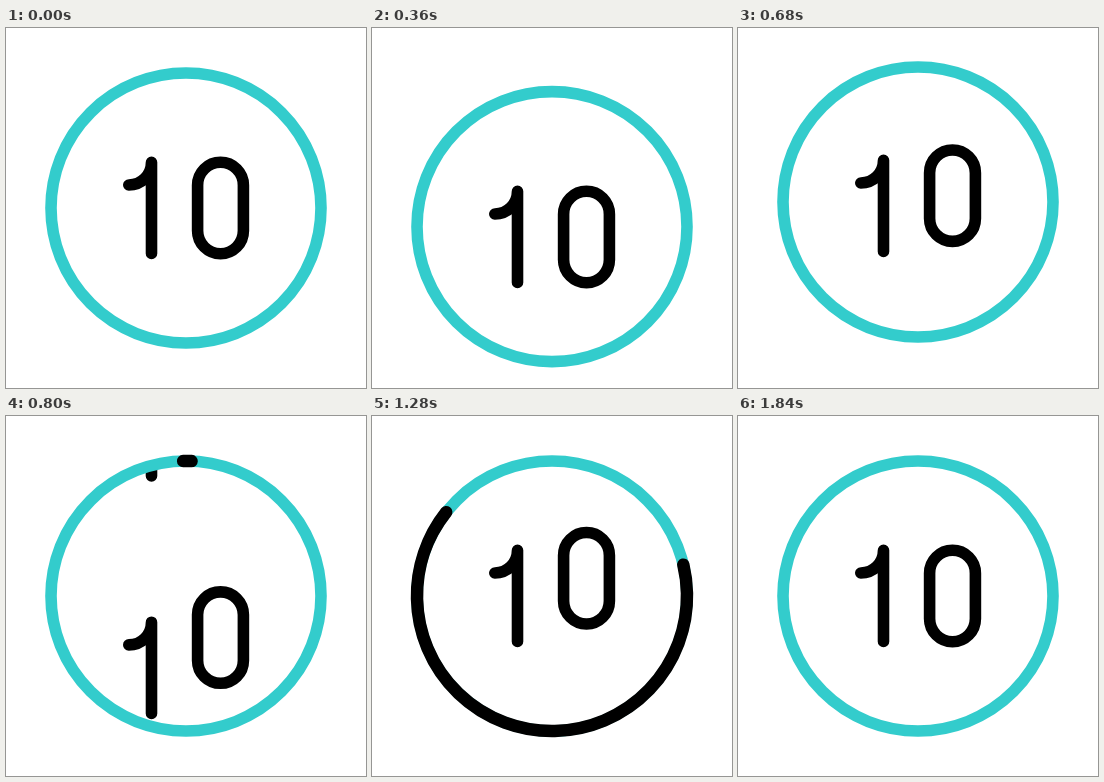
Write an HTML page that moves like this. It is 360x360 px and loops after 2 s.

```html
<!DOCTYPE html>
<html lang="en">
<head>
<meta charset="utf-8">
<title>Counter</title>
<style>
  html, body { margin: 0; width: 100%; height: 100%; overflow: hidden; background: #fff; }
  svg { display: block; width: 100%; height: 100%; }
</style>
</head>
<body>
<svg viewBox="0 0 360 360" fill="none" stroke-linecap="round" stroke-linejoin="round">
  <defs>
    <clipPath id="window"><circle cx="180" cy="180" r="133"/></clipPath>
    <path id="one" d="M122.8 157C135.5 157 145.5 147 145.5 134.3V225.5"/>
    <rect id="zero" x="191.6" y="134.3" width="45.8" height="91.4" rx="22.9"/>
  </defs>
  <g clip-path="url(#window)" stroke="#000" stroke-width="11.6">
    <use id="oneOut" href="#one"/>
    <use id="oneIn" href="#one"/>
    <use id="zeroOut" href="#zero"/>
    <use id="zeroIn" href="#zero"/>
  </g>
  <circle id="ring" cx="180" cy="180" r="135" stroke="#3cc" stroke-width="11.6"/>
  <circle id="arc" cx="180" cy="180" r="135" stroke="#000" stroke-width="12.5"
          pathLength="1" transform="rotate(-91.2 180 180)"/>
</svg>
<script>
const LOOP = 2000, STEP = 40;
const el = id => document.getElementById(id);

// Keys are [time, value] pairs, eased in and out between neighbours.
function tween(t, keys) {
  if (t <= keys[0][0]) return keys[0][1];
  for (let i = 1; i < keys.length; i++) {
    const [t0, a] = keys[i - 1], [t1, b] = keys[i];
    if (t < t1) {
      const u = (t - t0) / (t1 - t0);
      return a + (b - a) * u * u * (3 - 2 * u);
    }
  }
  return keys[keys.length - 1][1];
}

const bounce = [[120, 0], [340, 30.5], [560, -34.5]];
const shifts = {
  ring: [[120, 0], [340, 19.5], [560, -17], [760, 0]],
  oneOut: [...bounce, [1080, 206]],
  oneIn: [[640, -196], [1282, 0]],
  zeroOut: [...bounce, [1200, 206]],
  zeroIn: [[745, -196], [1402, 0]]
};
const arcHead = [[760, 0], [1440, 1]];
const arcTail = [[1040, 0], [1840, 1]];

function draw(t) {
  for (const id in shifts) {
    el(id).setAttribute("transform", `translate(0 ${tween(t, shifts[id])})`);
  }
  const tail = tween(t, arcTail), length = tween(t, arcHead) - tail;
  const arc = el("arc");
  arc.style.display = length > 0 ? "" : "none";
  arc.setAttribute("stroke-dasharray", `${Math.max(length, 0)} 2`);
  arc.setAttribute("stroke-dashoffset", -tail);
}

const start = performance.now();
function tick() {
  const t = (performance.now() - start) % LOOP;
  draw(Math.floor(t / STEP) * STEP);
  requestAnimationFrame(tick);
}
tick();
</script>
</body>
</html>
```
